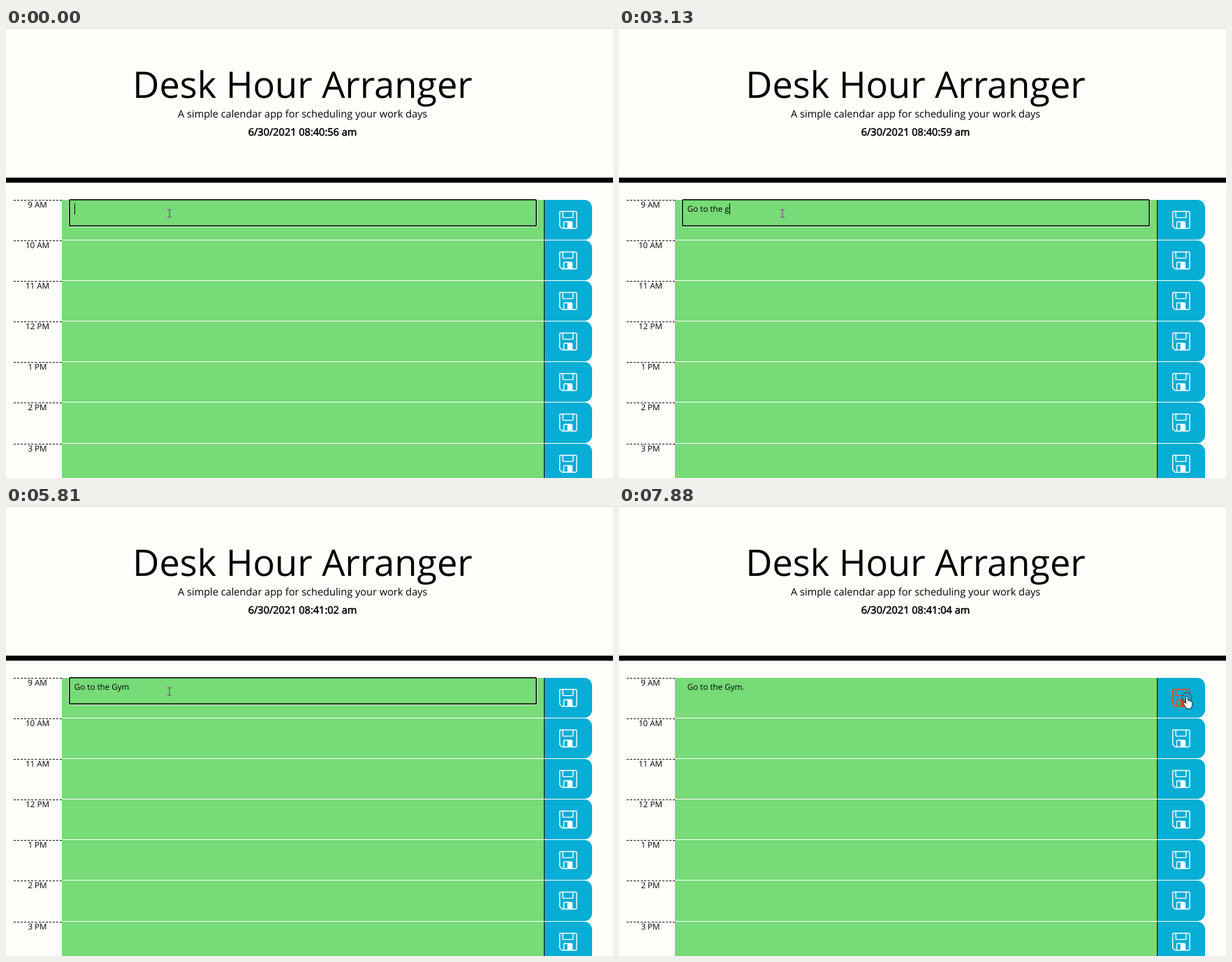
These frames come from a looping animation (869x644 px, 8000 ms). An HTML page:

```html
<!DOCTYPE html>
<html lang="en">
<head>
<meta charset="utf-8">
<title>Desk Hour Arranger</title>
<style>
  html, body { margin: 0; width: 100%; height: 100%; overflow: hidden; background: #fffefa; }
  svg { display: block; }
  text { font-family: "Open Sans", "Noto Sans", sans-serif; white-space: pre; text-rendering: geometricPrecision; }
  .mid { text-anchor: middle; }
  .small { font-size: 11.63px; }
  .icon { stroke-width: 1.4; }
</style>
</head>
<body>
<svg width="869" height="644" viewBox="0 0 869 644">
  <defs>
    <g id="disk">
      <path fill="none" stroke="currentColor" d="M1.7 .7H23.3Q25 .7 25 2.4V23.3Q25 25 23.3 25H4.2L.7 21.7V1.7Q.7 .7 1.7 .7ZM5.2 .7V8.6Q5.2 9.6 6.2 9.6H18.8Q19.8 9.6 19.8 8.6V.7M6.6 25V16.4Q6.6 15.4 7.6 15.4H17.4Q18.4 15.4 18.4 16.4V25"/>
      <path fill="currentColor" d="M11.7 16h6.7v9h-6.7z"/>
    </g>
  </defs>
  <path d="M0 .5H869" stroke="#d9d9d7"/>
  <text class="mid" x="424.5" y="99.5" font-size="52.35">Desk Hour Arranger</text>
  <text class="mid" x="424.7" y="128" font-size="14.54">A simple calendar app for scheduling your work days</text>
  <text class="mid" id="clock" x="424.5" y="154" font-size="14.54" stroke="#000" stroke-width=".55"></text>
  <rect y="214.2" width="869" height="7.2"/>
  <g id="rows"></g>
  <g id="focus" fill="none">
    <rect x="89.5" y="244.5" width="671" height="40" rx="3" stroke="#fff" stroke-opacity=".75"/>
    <rect x="90.75" y="245.75" width="668.5" height="37.5" rx="1.5" stroke="#000" stroke-width="1.5"/>
  </g>
  <text class="small" id="note" x="97.8" y="263"></text>
  <rect id="caret" y="251" width="1" height="16"/>
  <path id="beam" d="M-3 -5.5H-.7L0 -4.8L.7 -5.5H3M0 -5V5M-3 5.5H-.7L0 4.8L.7 5.5H3" fill="none" stroke="#882288"/>
  <path id="arrow" d="M0 0V11.5L2.6 9.1L4.4 13.1L6.3 12.2L4.6 8.4H8Z" fill="#fff" stroke="#000" stroke-width=".8"/>
  <circle id="ring" cx="813" cy="274" r="7" fill="#06add4" fill-opacity=".45" stroke="#075a78" stroke-width="1.2"/>
  <path id="hand" d="M-1.4 9V1Q-1.4 -.3 0 -.3T1.4 1V5.6Q3.4 4.8 4 6.3Q5.5 5.7 6 7.2Q7.6 6.8 7.6 8.6V12Q7.6 14 6 16.2V17.3H-.8V16Q-3 13.6 -5 9.9Q-5.5 8.4 -4.1 8.1Q-3 8 -1.4 10Z" fill="#fff" stroke="#000" stroke-width=".8"/>
</svg>
<script>
const $ = id => document.getElementById(id);
const LOOP = 8000;
const rowTop = i => Math.floor(246 + i * 58.17);

$("rows").innerHTML = ["9 AM", "10 AM", "11 AM", "12 PM", "1 PM", "2 PM", "3 PM"].map((label, i) => {
  const y = rowTop(i), end = rowTop(i + 1) - 1;
  return `<path d="M11 ${y + .5}H80" stroke="#000" stroke-dasharray="3 2.08" shape-rendering="crispEdges"/>
    <text class="small mid" x="45" y="${y + 10.6}">${label}</text>
    <path d="M80 ${y}H770V${end}H80Z" fill="#77db77"/>
    <path d="M770.5 ${y}V${end}" stroke="#000"/>
    <path d="M771 ${y}H828A11 11 0 0 1 839 ${y + 11}V${end - 11}A11 11 0 0 1 828 ${end}H771Z" fill="#06add4"/>
    <path d="M80 ${end + .5}H771" stroke="#fff"/>
    <use class="icon" href="#disk" x="792" y="${y + 15.8}" color="#fff"/>`;
}).join("");
const firstIcon = document.querySelector(".icon");

// Each entry: start time, typed text, caret visible
const lead = "Go to the ";
const typing = [
  [0, "", 1], [250, "", 0], [810, "", 1],
  ...[..."Go to th"].map((_, i) => [1090 + Math.round(i * 1000 / 7), lead.slice(0, i + 1), 1]),
  [2240, lead, 1], [2610, lead, 0], [2980, lead, 1], [3130, lead + "g", 1],
  [3410, lead, 1], [3610, lead + "G", 1], [3810, lead + "Gyn", 1], [4370, lead + "Gyn", 0],
  [4860, lead, 1], [5110, lead + "Gy", 1], [5250, lead + "Gym", 1], [5810, lead + "Gym", 0],
  [6340, lead + "Gym", 1], [6840, lead + "Gym", 0], [7110, lead + "Gym.", 1],
  [7610, lead + "Gym.", 0]
];
const ticks = [660, 1660, 2610, 3610, 4490, 5530, 6560, 7480];

// Each entry: start time, pointer shape, x, y
const pointer = [
  [0, "beam", 234, 265.5], [7240, "beam", 390, 267.5], [7360, "beam", 620, 268.5],
  [7480, "arrow", 780, 267], [7610, "hand", 813, 272.7]
];
const at = (list, t) => list.findLast(entry => entry[0] <= t);
const show = (id, on) => $(id).style.display = on ? "" : "none";

function draw() {
  const t = performance.now() % LOOP;
  const sec = 40 * 60 + 56 + ticks.filter(tick => tick <= t).length;
  const pad = n => String(n).padStart(2, "0");
  $("clock").textContent = `6/30/2021 08:${pad(Math.floor(sec / 60))}:${pad(sec % 60)} am`;

  const [, text, caret] = at(typing, t);
  $("note").textContent = text;
  $("caret").setAttribute("x", Math.round(97.8 + (text ? $("note").getComputedTextLength() : 0)));
  show("caret", caret);

  const [, shape, x, y] = at(pointer, t);
  for (const id of ["beam", "arrow", "hand"]) show(id, id === shape);
  $(shape).setAttribute("transform", `translate(${x} ${y})`);
  firstIcon.setAttribute("color", shape === "hand" ? "#ff4500" : "#fff");

  const clicked = t >= 7880;
  show("focus", !clicked);
  show("ring", clicked);
  requestAnimationFrame(draw);
}
draw();
</script>
</body>
</html>
```
